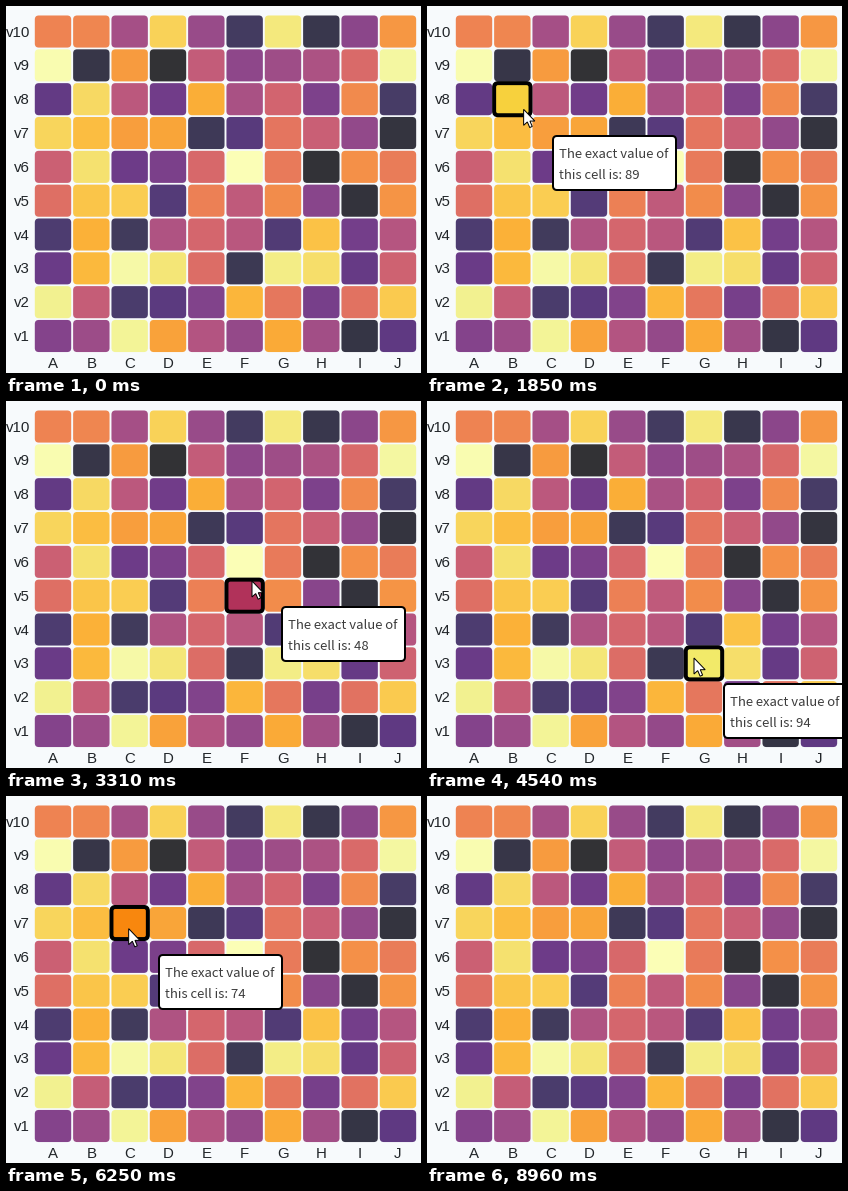
Recreate the animation shown at these times as a matplotlib script. Size 415x367 px, loop 9800 ms.

```python
import numpy as np
import matplotlib.pyplot as plt
from matplotlib.animation import FuncAnimation
from matplotlib.collections import PathCollection
from matplotlib.colors import to_rgb
from matplotlib.patches import FancyBboxPatch, Polygon

W, H, DPI = 415, 367, 64
PX = 72 / DPI  # points per pixel
LOOP, INTERVAL, TICK = 9800, 20, 76.7  # ms; the pointer moves once per tick
BG, INK, TIP_INK = "#f7fafc", "#212529", "#3c3c3c"

# The chart's readings: one row per column A-J, from v1 up to v10
VALUES = np.array([
    [30, 95, 22, 14, 59, 52, 88, 20, 99, 66],
    [37, 50, 81, 79, 84, 91, 82, 89, 6, 67],
    [96, 13, 98, 10, 86, 23, 74, 47, 73, 40],
    [75, 18, 92, 43, 16, 27, 76, 24, 1, 87],
    [44, 29, 58, 55, 65, 56, 9, 78, 49, 36],
    [35, 80, 8, 46, 48, 100, 17, 41, 33, 11],
    [77, 62, 94, 15, 69, 63, 61, 54, 38, 93],
    [39, 26, 90, 83, 31, 2, 51, 28, 42, 7],
    [5, 60, 21, 25, 3, 70, 34, 68, 57, 32],
    [19, 85, 53, 45, 71, 64, 4, 12, 97, 72],
])

# Band scales: centre of cell A/v1, step between cells, cell size
ORIGIN = np.array([47, 330])
STEP = np.array([38.33, -33.83])
CELL = np.array([36.4, 32.1])
TIP = np.array([125, 56])

# Pointer glides: start ms, end ms, destination
ENTRY = (183, 272)
GLIDES = [
    (300, 680, (161, 232)),
    (1140, 1140, (102, 203)),
    (1220, 1370, (50, 166)),
    (1690, 2460, (149, 33)),
    (2540, 2610, (178, 56)),
    (2690, 2690, (178, 128)),
    (3150, 3310, (246, 180)),
    (4240, 4540, (267, 257)),
    (4940, 5330, (185, 257)),
    (5710, 5710, (155, 260)),
    (5790, 6250, (122, 130)),
    (6800, 7330, (209, 281)),
    (7790, 8560, (284, 328)),
    (8880, 8880, (283, 352)),
]
VISITS = [(300, 2770), (3150, 8960)]  # when the pointer is over the page


def cell_color(value, opacity=1.0):
    rgb = np.array(plt.get_cmap("inferno")((value - 1) / 99)[:3])
    return opacity * rgb + (1 - opacity) * np.array(to_rgb(BG))


def cell_corner(cell):
    return ORIGIN + cell * STEP - CELL / 2


def rounded(corner, size, **style):
    return FancyBboxPatch(
        corner, *size, boxstyle="round,pad=0,rounding_size=4", **style)


def pointer_at(t):
    """Pointer position now and one tick before."""
    origin = pos = prev = np.array(ENTRY, float)
    for start, end, goal in GLIDES:
        if t < start:
            break
        steps = 1 + round((end - start) / TICK)
        k = min(1 + int((t - start) / TICK), steps)
        goal = np.array(goal, float)
        pos, prev = (goal + (origin - goal) * (1 - s / steps) ** 2
                     for s in (k, k - 1))
        origin = goal
    return pos, prev


def hover_point(pos, prev):
    """The hover state trails the pointer, more so at speed."""
    trail = prev - pos
    return pos + trail * (np.hypot(*trail) / 180) ** 2


def hovered_cell(point):
    cell = np.rint((point - ORIGIN) / STEP).astype(int)
    return cell if np.all((0 <= cell) & (cell < 10)) else None


fig = plt.figure(figsize=(W / DPI, H / DPI), dpi=DPI, facecolor=BG)
ax = fig.add_axes([0, 0, 1, 1])
ax.set(xlim=(0, W), ylim=(H, 0))
ax.axis("off")

grid = list(np.ndindex(VALUES.shape))
ax.add_collection(PathCollection(
    [rounded(cell_corner(cell), CELL).get_path() for cell in grid],
    facecolors=[cell_color(VALUES[cell], 0.8) for cell in grid], linewidths=0))

label = dict(family="Liberation Sans", size=15 * PX, color=INK, va="baseline")
for i in range(10):
    x, y = ORIGIN + i * STEP
    ax.text(x, 361.7, "ABCDEFGHIJ"[i], ha="center", **label)
    ax.text(24, y + 5, f"v{i + 1}", ha="right", **label)

focus = ax.add_patch(rounded((0, 0), CELL, ec="black", lw=4 * PX, zorder=3))
tip_box = ax.add_patch(rounded((0, 0), TIP - 2, fc="white", ec="black",
                               lw=2 * PX, zorder=4))
tip_lines = [ax.text(0, 0, "", family="Noto Sans CJK JP", size=13.1 * PX,
                     color=TIP_INK, va="baseline", zorder=5, clip_on=True)
             for _ in range(2)]

ARROW = np.array([(0, 0), (0, 16), (3.7, 12.6), (6.1, 18.2), (8.6, 17.1),
                  (6.3, 11.7), (11.2, 11.7)])
arrow = ax.add_patch(Polygon(ARROW, fc="white", ec="black", lw=PX, zorder=6))


def update(frame):
    t = frame * INTERVAL + INTERVAL / 2
    present = any(start <= t < end for start, end in VISITS)
    pos, prev = pointer_at(t)
    point = hover_point(pos, prev)
    cell = hovered_cell(point) if present else None

    arrow.set_visible(present)
    arrow.set_xy(ARROW + pos)
    for artist in (focus, tip_box, *tip_lines):
        artist.set_visible(cell is not None)
    if cell is not None:
        value = VALUES[tuple(cell)]
        focus.set_bounds(*cell_corner(cell), *CELL)
        focus.set_facecolor(cell_color(value))
        x, y = np.round(point + (29, 25))
        tip_box.set_bounds(x + 1, y + 1, *(TIP - 2))
        words = ("The exact value of", f"this cell is: {value}")
        for i, (line, text) in enumerate(zip(tip_lines, words)):
            line.set_position((x + 7, y + 23 + 21 * i))
            line.set_text(text)
    return focus, tip_box, *tip_lines, arrow


anim = FuncAnimation(fig, update, frames=LOOP // INTERVAL, interval=INTERVAL,
                     repeat=True, repeat_delay=0, blit=False)
plt.show()
```
